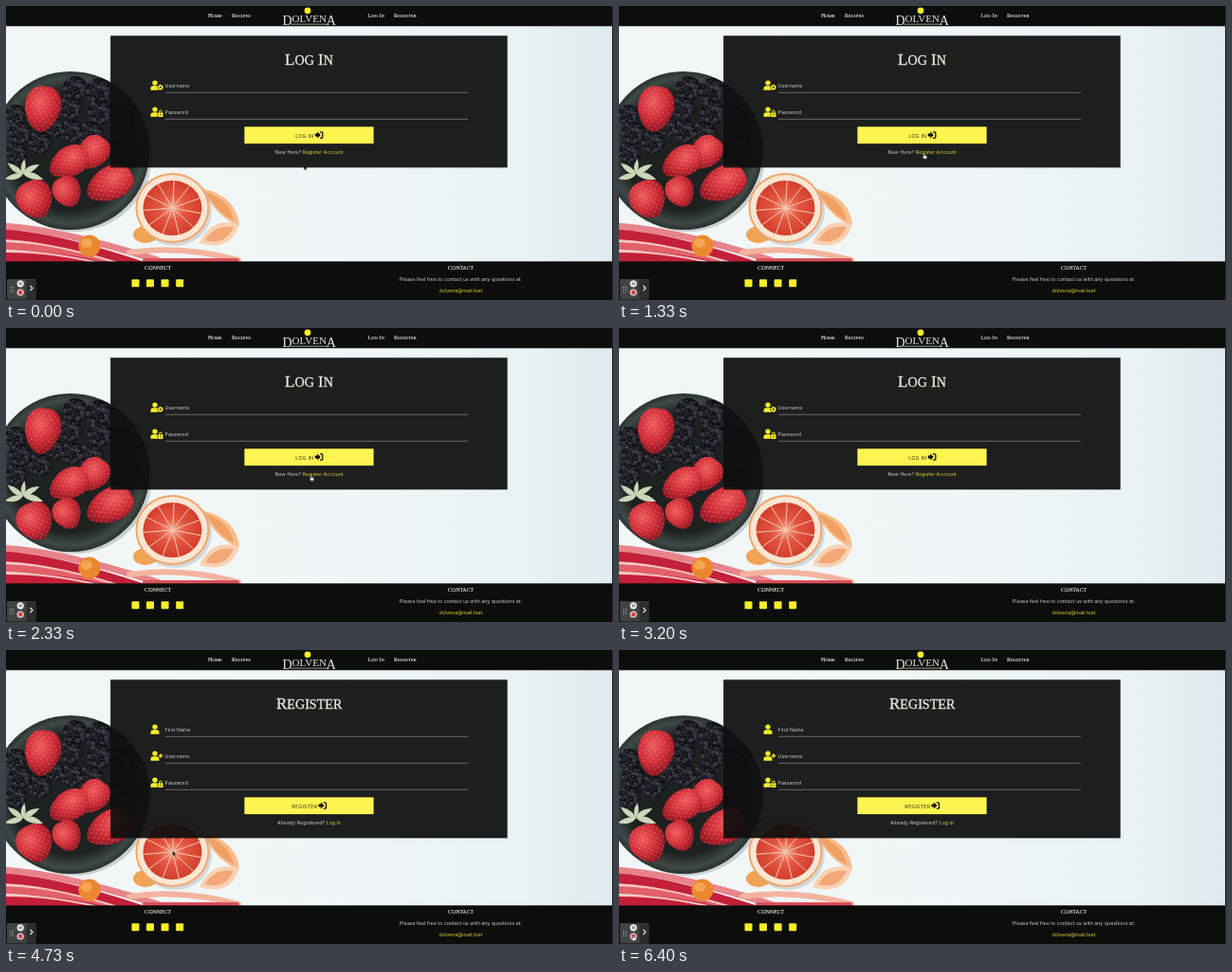
Write an HTML page that moves like this. It is 640x310 px and loops after 6530 ms.

```html
<!DOCTYPE html>
<html lang="en">
<head>
<meta charset="utf-8">
<title>Log In</title>
<style>
  html, body { margin: 0; width: 100%; height: 100%; overflow: hidden; background: #0d0d0c; }
  svg { display: block; width: 100%; height: 100%; }
  text { font: 5.3px Inter, sans-serif; fill: #c9c9c9; }
  .caps, .word { font-family: "Liberation Serif", serif; fill: #ebe7de; stroke: #ebe7de; stroke-width: .018em; }
  .mid { text-anchor: middle; }
  .gold { fill: #f8ee27; }
  .link { fill: #dccd33; }
  .btn { fill: #3a3818; letter-spacing: .2px; }
  .rule { stroke: #8a8a8a; stroke-width: .7; }
  .panel { fill: #0f0f0f; fill-opacity: .9; filter: drop-shadow(0 .5px .6px rgba(0, 0, 0, .35)); }

  .login, .register, .cursor, .arrow, .hand { animation: 6.53s infinite step-end; }
  .login { animation-name: login; }
  .register { animation-name: register; }
  .arrow { animation-name: arrow; }
  .hand { animation-name: hand; }
  .cursor { animation-name: travel; animation-timing-function: ease-in-out; }

  @keyframes login { 0% { visibility: visible } 52.98%, 100% { visibility: hidden } }
  @keyframes register { 0% { visibility: hidden } 52.98%, 100% { visibility: visible } }
  @keyframes arrow {
    0% { visibility: visible }
    7% { visibility: hidden }
    66.3% { visibility: visible }
    82.6%, 100% { visibility: hidden }
  }
  @keyframes hand {
    0% { visibility: hidden }
    7% { visibility: visible }
    48.98% { visibility: hidden }
    82.6%, 100% { visibility: visible }
  }
  @keyframes travel {
    0%, .9% { transform: translate(314px, 167.5px) }
    7%, 66.3% { transform: translate(322px, 155.5px) }
    66.3% { animation-timing-function: ease-in }
    72.4% { transform: translate(177px, 211px); animation-timing-function: ease-out }
    82.6%, 87% { transform: translate(16.5px, 300.5px) }
    96%, 100% { transform: translate(15.3px, 301px) }
  }
</style>
</head>
<body>
<svg viewBox="0 0 640 310">
  <defs>
    <linearGradient id="wall">
      <stop offset="0" stop-color="#f2f6f7"/>
      <stop offset=".55" stop-color="#f0f6f7"/>
      <stop offset=".85" stop-color="#e9f2f4"/>
      <stop offset="1" stop-color="#dfeaef"/>
    </linearGradient>
    <radialGradient id="dish">
      <stop offset=".75" stop-color="#1d2120"/>
      <stop offset=".92" stop-color="#3e4a46"/>
      <stop offset="1" stop-color="#2a312f"/>
    </radialGradient>
    <radialGradient id="red" cx=".4" cy=".35" r=".7">
      <stop offset="0" stop-color="#ee5f60"/>
      <stop offset=".55" stop-color="#cf2b38"/>
      <stop offset="1" stop-color="#7f1220"/>
    </radialGradient>
    <radialGradient id="flesh">
      <stop offset="0" stop-color="#f5a68c"/>
      <stop offset=".45" stop-color="#e4553f"/>
      <stop offset="1" stop-color="#d23f2d"/>
    </radialGradient>
    <pattern id="seeds" width="6" height="7" patternUnits="userSpaceOnUse">
      <ellipse cx="1.5" cy="2" rx=".4" ry=".7" fill="#f0b078"/>
      <ellipse cx="4.5" cy="5.5" rx=".4" ry=".7" fill="#f0b078"/>
    </pattern>
    <path id="heart" d="M0-22C14-24 22-10 17 4C13 15 5 22 0 22C-6 22-14 15-18 4C-22-10-14-24 0-22Z"/>
    <g id="berry">
      <use href="#heart" fill="url(#red)"/>
      <use href="#heart" fill="url(#seeds)"/>
    </g>
    <path id="leaf" d="M0 0Q7-7 20 0Q8 5 0 0Z"/>

    <g id="user" class="gold">
      <circle cx="4.5" cy="2.6" r="2.7"/>
      <path d="M0 10.3V8.6Q0 5.8 2.6 5.8H6.4Q9 5.8 9 8.6V10.3Z"/>
    </g>
    <g id="lock">
      <use href="#user"/>
      <rect x="7.2" y="4.7" width="6" height="6" fill="#242424"/>
      <rect x="7.8" y="6" width="5.2" height="4.4" rx=".6" class="gold"/>
      <path d="M9 6.4V5Q9 3.6 10.4 3.6T11.8 5V6.4" fill="none" stroke="#f8ee27"/>
      <circle cx="10.4" cy="8.2" r=".7" fill="#222"/>
    </g>
    <g id="cog">
      <use href="#user"/>
      <circle cx="10.3" cy="7.2" r="3.3" fill="#242424"/>
      <circle cx="10.3" cy="7.2" r="1.8" fill="none" stroke="#f8ee27" stroke-width="1.5"/>
      <circle cx="10.3" cy="7.2" r="2.7" fill="none" stroke="#f8ee27" stroke-width=".7" stroke-dasharray="1.4 1.43"/>
    </g>
    <g id="plus">
      <use href="#user"/>
      <path d="M8.4 5H12.8M10.6 2.8V7.2" stroke="#f8ee27" stroke-width="1.3"/>
    </g>
    <g id="enter" fill="#111">
      <path d="M0 2.3H2.4V.4L6 3.8L2.4 7.2V5.3H0Z"/>
      <path d="M5.2 .6H7Q8 .6 8 1.6V6Q8 7 7 7H5.2" fill="none" stroke="#111" stroke-width="1.3"/>
    </g>
  </defs>

  <!-- Backdrop -->
  <rect y="21" width="640" height="249" fill="url(#wall)"/>
  <g fill="none" stroke-linecap="round">
    <path d="M-5 232Q55 235 160 268" stroke="#e8838a" stroke-width="7"/>
    <path d="M-5 241Q50 243 150 277" stroke="#c3203a" stroke-width="11"/>
    <path d="M-5 253Q60 254 130 278" stroke="#e2606a" stroke-width="8"/>
    <path d="M-5 265Q50 262 105 276" stroke="#c41f38" stroke-width="11"/>
    <path d="M-5 247Q50 248 140 278M-5 259Q50 258 115 275" stroke="#f6c3c0" stroke-width="2"/>
    <path d="M130 260Q185 252 245 268" stroke="#f3b49f" stroke-width="6"/>
    <path d="M146 268H244" stroke="#d9505a" stroke-width="4"/>
  </g>
  <ellipse cx="72" cy="157" rx="82" ry="81" fill="#8d979a" opacity=".4"/>
  <circle cx="68" cy="152.5" r="83.5" fill="url(#dish)"/>
  <g id="blackberries"/>
  <use href="#berry" transform="translate(92 155) rotate(35) scale(.85)"/>
  <use href="#berry" transform="translate(39 109) rotate(8) scale(1.02 1.1)"/>
  <use href="#berry" transform="translate(66 165) rotate(60) scale(.85 1)"/>
  <use href="#berry" transform="translate(65 196) rotate(-25) scale(.8 .75)"/>
  <use href="#berry" transform="translate(31 204) rotate(-22) scale(1.02 .92)"/>
  <use href="#berry" transform="translate(109 188) rotate(62) scale(.95 1.18)"/>
  <g fill="#ccd6b8">
    <use href="#leaf" transform="translate(18 177) rotate(-30)"/>
    <use href="#leaf" transform="translate(18 177) rotate(15) scale(1.1)"/>
    <use href="#leaf" transform="translate(18 177) rotate(-85) scale(.8)"/>
    <use href="#leaf" transform="translate(18 177) rotate(-145)"/>
    <use href="#leaf" transform="translate(18 177) rotate(165)"/>
  </g>
  <path d="M206 192Q244 201 246 232Q222 223 206 192Z" fill="#f7bd8c"/>
  <path d="M211 196Q236 205 240 226Q222 218 211 196Z" fill="#f0a062"/>
  <path d="M204 250Q216 222 246 230Q237 260 204 250Z" fill="#f9d2b4"/>
  <path d="M210 247Q220 230 240 233Q231 253 210 247Z" fill="#f2a878"/>
  <ellipse cx="147" cy="241" rx="13" ry="9" fill="#f0a454"/>
  <circle cx="88" cy="253" r="11.5" fill="#ea8830"/>
  <ellipse cx="85" cy="250" rx="6" ry="5" fill="#f4a653"/>
  <ellipse cx="178" cy="216" rx="39" ry="37" fill="#9aa2a5" opacity=".35"/>
  <ellipse cx="175.5" cy="213" rx="39" ry="37" fill="#f0a76c"/>
  <ellipse cx="175.5" cy="213" rx="37" ry="35" fill="#fbe6d4"/>
  <ellipse cx="175.5" cy="213" rx="31" ry="29" fill="url(#flesh)"/>
  <g id="spokes" stroke="#f8c9b0"/>

  <!-- Header and footer -->
  <rect width="640" height="21.3" fill="#0d0d0c"/>
  <rect y="269.3" width="640" height="41" fill="#0d0d0c"/>
  <rect x="639" width="1" height="310" fill="#222"/>
  <text class="caps" x="213" y="12.2" data-size="5.85">Home</text>
  <text class="caps" x="238" y="12.2" data-size="5.85">Recipes</text>
  <text class="caps" x="381.5" y="12.2" data-size="5.85">Log In</text>
  <text class="caps" x="409" y="12.2" data-size="5.85">Register</text>
  <circle cx="318" cy="4.8" r="3.4" class="gold"/>
  <text class="word mid" x="319.7" y="19.6" style="font-size:14px;stroke:none">D<tspan dy="-2.4" font-size="11">OLVEN</tspan><tspan dy="2.4">A</tspan></text>
  <path d="M300 19.2H340" stroke="#d8d5cf" stroke-width=".7"/>

  <text class="caps mid" x="160" y="278" data-size="7">Connect</text>
  <text class="caps mid" x="479.4" y="278" data-size="6.9">Contact</text>
  <g class="gold">
    <rect x="132.5" y="288.3" width="8" height="8" rx="1"/>
    <rect x="148" y="288.3" width="8" height="8" rx="1"/>
    <rect x="163.6" y="288.3" width="8" height="8" rx="1"/>
    <rect x="179.2" y="288.3" width="8" height="8" rx="1"/>
  </g>
  <text class="mid" x="479.4" y="289.8">Please feel free to contact us with any questions at:</text>
  <text class="mid link" x="479.4" y="302">dolvena@mail.test</text>

  <!-- Forms -->
  <g class="login">
    <rect class="panel" x="110.2" y="31.4" width="418.4" height="138.9"/>
    <text class="caps mid" x="319.5" y="62" data-size="17">Log In</text>
    <use href="#cog" x="152.5" y="78.5"/>
    <text x="167.5" y="85.8">Username</text>
    <use href="#lock" x="152.5" y="106.5"/>
    <text x="167.5" y="113.8">Password</text>
    <path class="rule" d="M168 91.3H487M168 119.3H487"/>
    <rect x="251.4" y="127.3" width="136.2" height="17.8" fill="#fff450"/>
    <text class="btn" x="305.3" y="138.9">LOG IN</text>
    <use href="#enter" x="325.8" y="132.2"/>
    <text x="283.6" y="155.8">New Here? <tspan class="link">Register Account</tspan></text>
  </g>
  <g class="register">
    <rect class="panel" x="110.2" y="31.4" width="418.4" height="166.9"/>
    <text class="caps mid" x="319.7" y="62" data-size="17">Register</text>
    <use href="#user" x="152.5" y="78.5"/>
    <text x="167.5" y="85.8">First Name</text>
    <use href="#plus" x="152.5" y="106.5"/>
    <text x="167.5" y="113.8">Username</text>
    <use href="#lock" x="152.5" y="134.5"/>
    <text x="167.5" y="141.8">Password</text>
    <path class="rule" d="M168 91.3H487M168 119.3H487M168 147.3H487"/>
    <rect x="251.4" y="155.3" width="136.2" height="17.8" fill="#fff450"/>
    <text class="btn" x="301.3" y="166.9">REGISTER</text>
    <use href="#enter" x="329.5" y="160.2"/>
    <text x="286" y="183.8">Already Registered? <tspan class="link">Log In</tspan></text>
  </g>

  <!-- Recorder controls -->
  <rect x="1" y="288" width="30.5" height="21.5" rx="1" fill="#414343"/>
  <rect x="21.5" y="288.5" width="9.5" height="20.5" fill="#2c2e2e"/>
  <path d="M4.8 296V302M7.3 296V302" stroke="#c4c4c4" stroke-dasharray="1 1.4"/>
  <circle cx="15.2" cy="292.8" r="3.6" fill="#f2f2f2"/>
  <path d="M14.2 291.2V294.4M16.2 291.2V294.4" stroke="#444" stroke-width=".9"/>
  <circle cx="15.2" cy="302" r="3.6" fill="#f2dede"/>
  <rect x="13" y="299.8" width="4.4" height="4.4" rx=".8" fill="#d0454b"/>
  <path d="M25.5 294.8L28 297.5L25.5 300.2" fill="none" stroke="#fff" stroke-width="1.1"/>

  <g class="cursor">
    <path class="arrow" d="M0 0V5L1.2 4L2 5.8L2.9 5.4L2.1 3.7H3.6Z" fill="#0a0a0a" stroke="#888" stroke-width=".2"/>
    <path class="hand" d="M-.6 .5Q0-.3 .5 .5V2.2L2.3 2.6Q2.8 2.8 2.7 3.6L2.2 5.6H-.6L-2 3.4Q-1.7 2.6-.6 3.3Z" fill="#fff" stroke="#222" stroke-width=".3"/>
  </g>
</svg>
<script>
  const NS = "http://www.w3.org/2000/svg";
  const add = (parent, tag, attrs) => {
    const el = document.createElementNS(NS, tag);
    for (const key in attrs) el.setAttribute(key, attrs[key]);
    return parent.appendChild(el);
  };

  // Shallow small caps: lower-case letters become capitals at 83 % size.
  for (const el of document.querySelectorAll(".caps")) {
    const size = +el.dataset.size;
    const parts = el.textContent.match(/[A-Z ]+|[a-z]+/g);
    el.textContent = "";
    el.style.fontSize = size + "px";
    for (const part of parts) {
      const small = /[a-z]/.test(part);
      add(el, "tspan", { "font-size": small ? size * .83 : size }).textContent = part.toUpperCase();
    }
  }

  // Blackberries: drupelets on a sunflower spiral.
  const bowl = document.getElementById("blackberries");
  const tones = ["#17151c", "#25232c", "#34323b"];
  function blackberry(x, y, r) {
    const g = add(bowl, "g", { transform: `translate(${x} ${y})` });
    add(g, "circle", { r, fill: "#121016" });
    for (let i = 22; i >= 0; i--) {
      const d = r * .92 * Math.sqrt(i / 22), a = i * 2.4;
      const cx = d * Math.cos(a), cy = d * Math.sin(a);
      add(g, "circle", { cx, cy, r: r * .21, fill: tones[i % 3] });
      add(g, "circle", { cx: cx - .5, cy: cy - .6, r: .5, fill: "#77757f" });
    }
  }
  [[10, 115, 11], [73, 87, 13], [98, 90, 14], [68, 108, 12], [99, 112, 13], [52, 128, 10],
   [70, 132, 12], [90, 135, 13], [15, 134, 12], [36, 144, 12], [11, 155, 11],
   [122, 118, 12], [126, 148, 12]]
    .forEach(berry => blackberry(...berry));

  const spokes = document.getElementById("spokes");
  for (let i = 0; i < 11; i++) {
    const a = i * 2 * Math.PI / 11 + .2;
    add(spokes, "line", {
      x1: 175.5, y1: 213, x2: 175.5 + 31 * Math.cos(a), y2: 213 + 29 * Math.sin(a)
    });
  }
</script>
</body>
</html>
```
